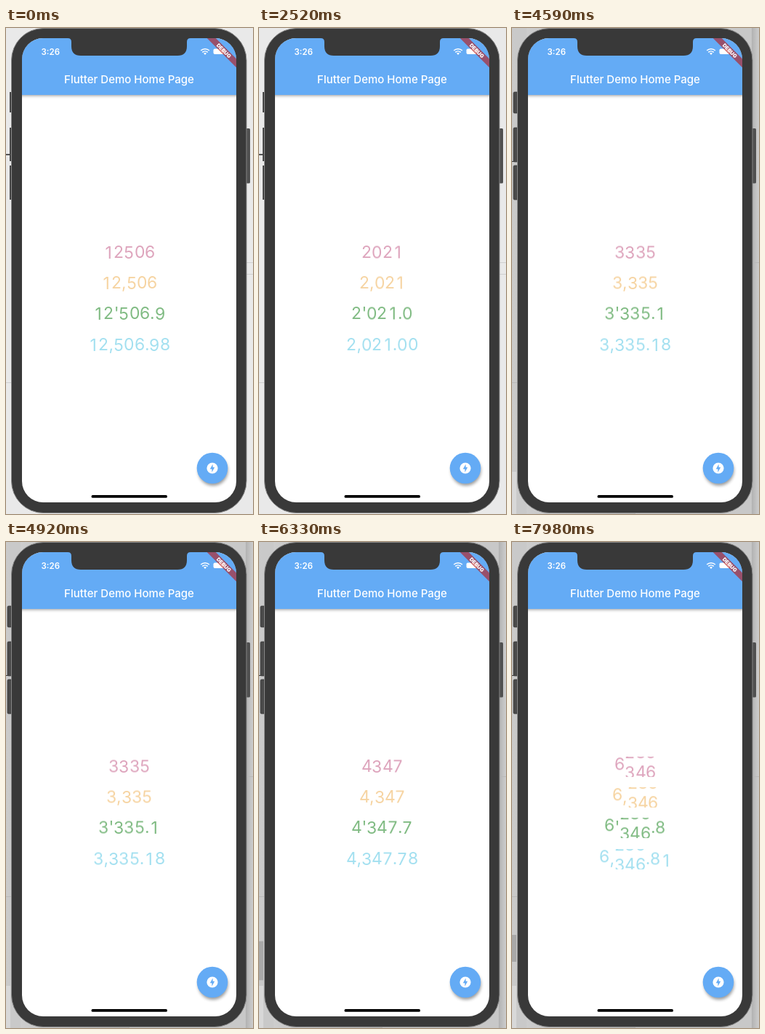
Recreate the animation shown at these times as an HTML page. Size 340x668 px, loop 8000 ms.

```html
<!DOCTYPE html>
<html lang="en">
<head>
<meta charset="utf-8">
<title>Rolling digits</title>
<style>
  html, body { margin: 0; width: 100%; height: 100%; overflow: hidden; background: #e9e9e9; }
  #stage { position: absolute; left: 0; top: 0; width: 340px; height: 668px; overflow: hidden; }
  svg { position: absolute; left: 0; top: 0; font-family: Inter, sans-serif; }
  .row {
    position: absolute; left: 0; width: 339px; height: 28px;
    display: flex; justify-content: center;
    font: 400 23px/27.5px Inter, sans-serif;
  }
  .digit { width: 14.25px; height: 28px; overflow: hidden; text-align: center; }
  .mark { width: 6.6px; text-align: center; }
  .strip { will-change: transform; }
  .strip div { height: 27.5px; }
</style>
</head>
<body>
<div id="stage">
  <svg width="340" height="668" viewBox="0 0 340 668">
    <defs>
      <clipPath id="screen"><rect x="22" y="14" width="295" height="638" rx="29"/></clipPath>
      <linearGradient id="leftShade"><stop offset="0" stop-color="#d0d0d0"/><stop offset="1" stop-color="#b4b4b4"/></linearGradient>
      <linearGradient id="rightShade"><stop offset="0" stop-color="#b2b2b2"/><stop offset="1" stop-color="#cdcdcd"/></linearGradient>
      <filter id="blur" x="-50%" y="-50%" width="200%" height="200%"><feGaussianBlur stdDeviation="2.2"/></filter>
    </defs>

    <g id="idle">
      <rect width="340" height="668" fill="#e9e9e9"/>
      <path d="M0 487.5H7M331 322.5H340M331 338.5H340" stroke="#cfcfcf"/>
      <path d="M0 174H6" stroke="#222" stroke-width="1.5"/>
      <path d="M5 88h3v28h-3zM5 137h3v46h-3zM5 189h3v47h-3z" fill="#454545"/>
    </g>
    <g id="focused">
      <rect width="170" height="668" fill="url(#leftShade)"/>
      <rect width="20" height="668" fill="#c6c6c6" opacity=".6"/>
      <rect x="170" width="170" height="668" fill="#c8c8c8"/>
      <rect x="330" width="10" height="668" fill="url(#rightShade)"/>
      <rect y="610" width="6" height="58" fill="#d8d8d8"/>
      <path d="M0 183.5H6" stroke="#333"/>
      <path d="M331 322.5H340M0 487.5H7" stroke="#b9b9b9"/>
      <rect id="patch" width="6" fill="#a8a8a8"/>
      <g fill="#4a4a4a" stroke="#333" stroke-width=".7">
        <rect x="2" y="88" width="7" height="29" rx="1.5"/>
        <rect x="2" y="137" width="7" height="47" rx="1.5"/>
        <rect x="2" y="189" width="7" height="47" rx="1.5"/>
      </g>
    </g>
    <rect x="329" y="138" width="7" height="75.5" rx="1.5" fill="#505050"/>
    <rect x="7.5" y=".5" width="323.5" height="666" rx="44" fill="#393939" stroke="#858585"/>

    <g clip-path="url(#screen)">
      <rect x="22" y="14" width="295" height="638" fill="#fff"/>
      <rect x="18" y="20" width="303" height="73" fill="#000" opacity=".4" filter="url(#blur)"/>
      <rect x="22" y="14" width="295" height="78" fill="#64abf5"/>
      <path d="M85 14Q90 14 90 19V25Q90 38 103 38H236Q249 38 249 25V19Q249 14 254 14Z" fill="#393939"/>
      <g fill="#fff">
        <text x="48.5" y="37" font-size="11.5" font-weight="600">3:26</text>
        <text x="169.5" y="76" font-size="15" font-weight="500" text-anchor="middle">Flutter Demo Home Page</text>
        <path d="M274 37l-2-2.2a3 3 0 0 1 4 0z"/>
        <g fill="none" stroke="#fff" stroke-width="1.6">
          <path d="M270.3 33.4a5.4 5.4 0 0 1 7.4 0M268.2 31a8.4 8.4 0 0 1 11.6 0"/>
        </g>
        <rect x="285.5" y="28.5" width="15" height="7.5" rx="2"/>
        <rect x="301.3" y="30.8" width="1.2" height="3" rx=".6"/>
      </g>
      <g transform="translate(317 14) rotate(45)">
        <rect x="-28.5" y="19.95" width="57" height="8.55" fill="#b71c1c" fill-opacity=".63"/>
        <text y="26.9" font-size="7.2" font-weight="900" fill="#fff" text-anchor="middle">DEBUG</text>
      </g>
      <circle cx="285" cy="608.5" r="20.5" opacity=".4" filter="url(#blur)"/>
      <circle cx="284" cy="605" r="21.3" fill="#64abf5"/>
      <circle cx="284" cy="605" r="7.6" fill="#fff"/>
      <path d="M284.6 599.5V603.8H287.2L283.4 610.8V606.3H280.8Z" fill="#64abf5"/>
      <rect x="117.5" y="642" width="104.5" height="3.8" rx="1.9"/>
    </g>
  </svg>
</div>
<script>
const LOOP = 8000, ROLL = 300, PITCH = 27.5, FOCUS_AT = 3300;
// Start time and new value, with two decimals and no point
const steps = [
  [-ROLL, "1250698"], [60, "0202100"], [3610, "0333518"],
  [4920, "0396514"], [5565, "0434778"], [6550, "0558972"],
  [7075, "0565936"], [7495, "0634681"], [7915, "0701380"]
];
const rows = [
  ["#dea5bd", "", 0], ["#f6d4a2", ",", 0],
  ["#80bb83", "'", 1], ["#a3e0f0", ",", 2]
];
const byId = id => document.getElementById(id);
const stage = byId("stage");
const columns = [];

function add(parent, className, text = "") {
  const el = document.createElement("div");
  el.className = className;
  el.textContent = text;
  return parent.appendChild(el);
}

rows.forEach(([color, separator, decimals], r) => {
  const row = add(stage, "row");
  row.style.top = 295 + r * 42.2 + "px";
  row.style.color = color;
  for (let place = 0; place < 5 + decimals; place++) {
    if (place === 2 && separator) add(row, "mark", separator);
    if (place === 5) add(row, "mark", ".");
    const box = add(row, "digit");
    const strip = add(box, "strip");
    for (let n = 0; n < 10; n++) add(strip, "", n);
    columns.push({ box, strip, place });
  }
});

// Cubic Bézier (.42, 0, .58, 1)
function easeInOut(u) {
  if (u >= 1) return 1;
  let lo = 0, hi = 1;
  for (let i = 0; i < 20; i++) {
    const s = (lo + hi) / 2, q = 1 - s;
    const x = 1.26 * s * q * q + 1.74 * s * s * q + s * s * s;
    if (x < u) lo = s; else hi = s;
  }
  return lo * lo * (3 - 2 * lo);
}

function drawBackdrop(t) {
  const focused = t >= FOCUS_AT;
  byId("idle").style.display = focused ? "none" : "";
  byId("focused").style.display = focused ? "" : "none";
  const k = (t - 5700) / 2280;
  const patch = byId("patch");
  patch.style.display = t >= 5100 ? "" : "none";
  patch.setAttribute("y", 552 - 12 * k);
  patch.setAttribute("height", 60 - 23 * k);
}

function draw(t) {
  let i = steps.length - 1;
  while (steps[i][0] > t) i--;
  const [start, to] = steps[i];
  const from = steps[Math.max(0, i - 1)][1];
  const p = easeInOut((t - start) / ROLL);
  for (const { box, strip, place } of columns) {
    box.style.display = place === 0 && to[0] === "0" ? "none" : "";
    const value = +from[place] + (to[place] - from[place]) * p;
    strip.style.transform = `translateY(${-value * PITCH}px)`;
  }
  drawBackdrop(t);
}

const origin = performance.now();
function tick() {
  draw((performance.now() - origin) % LOOP);
  requestAnimationFrame(tick);
}
tick();
</script>
</body>
</html>
```
